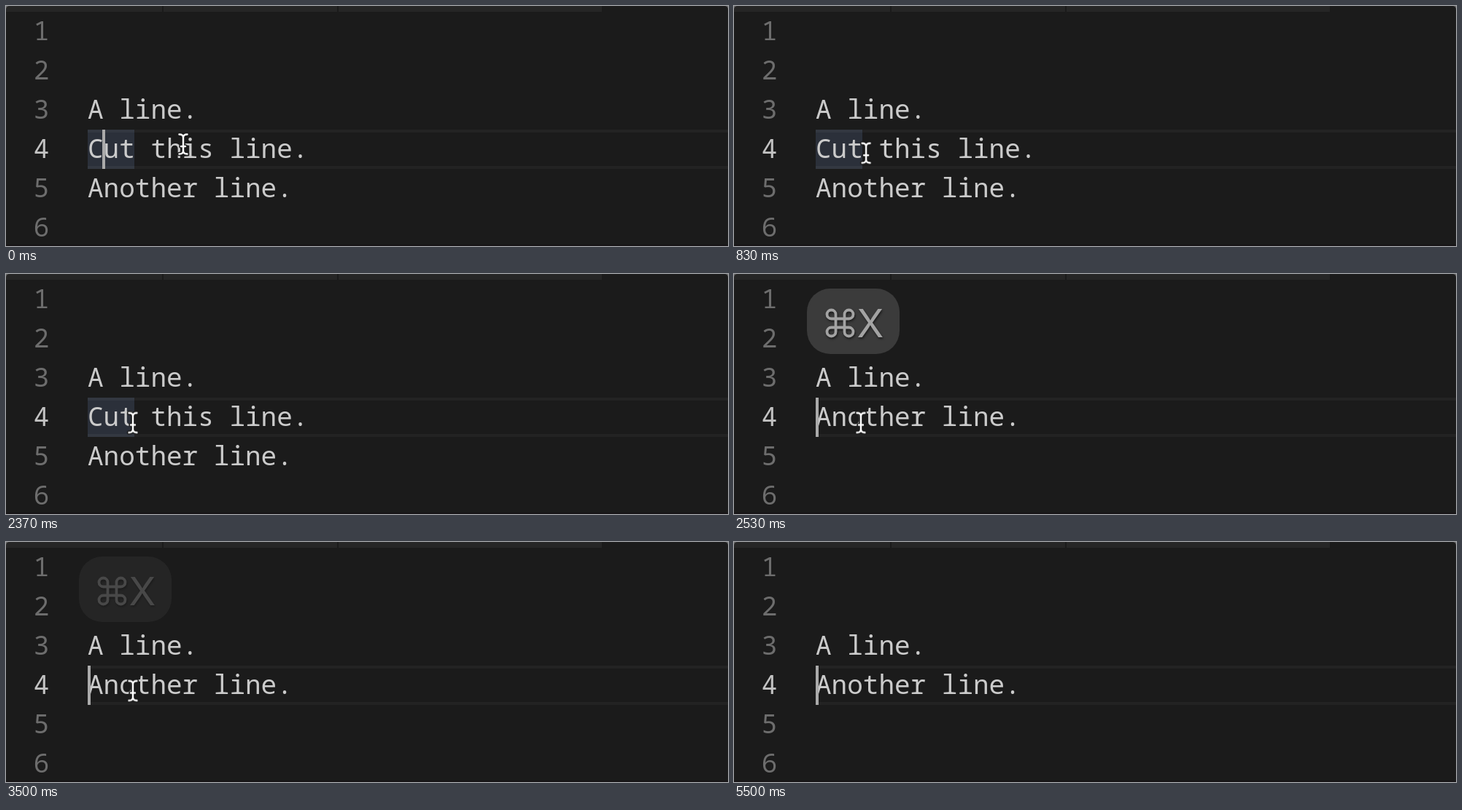
These frames come from a looping animation (990 by 330 pixels, 5630 ms). An HTML page:

```html
<!DOCTYPE html>
<html lang="en">
<head>
<meta charset="utf-8">
<title>Cut a line</title>
<style>
html, body { margin: 0; width: 100%; height: 100%; overflow: hidden; background: #1b1b1b; }
svg { display: block; width: 990px; height: 330px; }
text { font: 36px "Noto Sans Mono", "DejaVu Sans Mono", monospace; fill: #cbcbcb; }
.gutter text { fill: #6d6d6d; }
.gutter .current { fill: #c2c2c2; }

.before, .after, .caret, .caret-place, .badge, .pointer {
  animation: 5630ms step-end infinite;
}
.before { animation-name: before; }
.after { animation-name: after; }
.caret { animation-name: blink; }
.caret-place { animation-name: caret-place; }
.badge { animation-name: badge; }
.pointer { animation-name: pointer; }

@keyframes before { 0% { opacity: 1 } 44.4%, 100% { opacity: 0 } }
@keyframes after { 0% { opacity: 0 } 44.4%, 100% { opacity: 1 } }
@keyframes caret-place {
  0% { transform: translate(132px, 170px) }
  44.4%, 100% { transform: translate(112px, 170px) }
}
@keyframes blink {
  0%, 15.43%, 33.21%, 44.4%, 62.16%, 79.92%, 97.69%, 100% { opacity: 1 }
  6.57%, 24.33%, 42.09%, 53.28%, 71.04%, 88.8% { opacity: 0 }
}
@keyframes badge {
  0% { opacity: 0 }
  44.93% { opacity: 1 }
  60.32% { opacity: 1; animation-timing-function: steps(6, start) }
  63.87%, 100% { opacity: 0 }
}
/* Glides to the word, then darts away and hides. */
@keyframes pointer {
  0% { transform: translate(243px, 190px); opacity: 1 }
  10.586% { transform: translate(243px, 190px); opacity: 1; animation-timing-function: steps(3, start) }
  12.362% { transform: translate(218px, 195.4px); opacity: 1; animation-timing-function: steps(4, start) }
  14.73% { transform: translate(183.5px, 201.5px); opacity: 1; animation-timing-function: steps(4, start) }
  17.099% { transform: translate(174px, 204.5px); opacity: 1 }
  79.92% { transform: translate(184px, 187.5px); opacity: 1 }
  80.46% { transform: translate(289px, 80px); opacity: 1 }
  81.17%, 100% { transform: translate(289px, 80px); opacity: 0 }
}

.ibeam { fill: none; stroke-linecap: round; stroke-linejoin: round; }
.key { filter: drop-shadow(1px 2px 1.5px rgba(0, 0, 0, .55)); }
.key text { font: 54px Inter, "Liberation Sans", sans-serif; fill: #a3a3a3; }
.key path { fill: none; stroke: #a3a3a3; stroke-width: 3.8; }
</style>
</head>
<body>
<svg viewBox="0 0 990 330">
  <defs>
    <path id="ibeam" d="M-5.5-13.5Q0-13.5 0-9Q0-13.5 5.5-13.5M0-9V9M-5.5 13.5Q0 13.5 0 9Q0 13.5 5.5 13.5M-3 3H3"/>
  </defs>

  <rect width="990" height="330" fill="#1b1b1b"/>
  <rect width="817" height="8" fill="#262626"/>
  <path d="M215 0V8M455 0V8" stroke="#1b1b1b" stroke-width="2"/>
  <path d="M0 0H5Q0 0 0 5ZM990 0H985Q990 0 990 5Z" fill="#666"/>
  <rect y="328" width="990" height="2" fill="#171516"/>

  <rect class="before" x="112" y="170" width="64" height="54" fill="#2b303a"/>
  <path d="M112 172H990M112 222H990" stroke="#fff" stroke-opacity=".04" stroke-width="4"/>

  <g class="gutter">
    <text x="37.8" y="47">1</text>
    <text x="37.8" y="101">2</text>
    <text x="37.8" y="155">3</text>
    <text x="37.8" y="209" class="current">4</text>
    <text x="37.8" y="263">5</text>
    <text x="37.8" y="317">6</text>
  </g>

  <text x="112" y="155">A line.</text>
  <g class="before">
    <text x="112" y="209">Cut this line.</text>
    <text x="112" y="263">Another line.</text>
  </g>
  <text class="after" x="112" y="209">Another line.</text>

  <g class="caret-place">
    <rect class="caret" width="4" height="54" fill="#aaa"/>
  </g>

  <g class="badge">
    <rect x="100" y="20" width="127" height="90" rx="32" fill="#3b3b3b"/>
    <g class="key">
      <path transform="translate(145.5 67.5)" d="M-6-6H12a6 6 0 1 0-6-6V12a6 6 0 1 0 6-6H-12a6 6 0 1 0 6 6V-12a6 6 0 1 0-6 6Z"/>
      <text x="187" y="87" text-anchor="middle">X</text>
    </g>
  </g>

  <g class="pointer">
    <g class="ibeam">
      <use href="#ibeam" stroke="#1b1b1b" stroke-width="5.5"/>
      <use href="#ibeam" stroke="#fff" stroke-width="2.4"/>
    </g>
  </g>
</svg>
</body>
</html>
```
